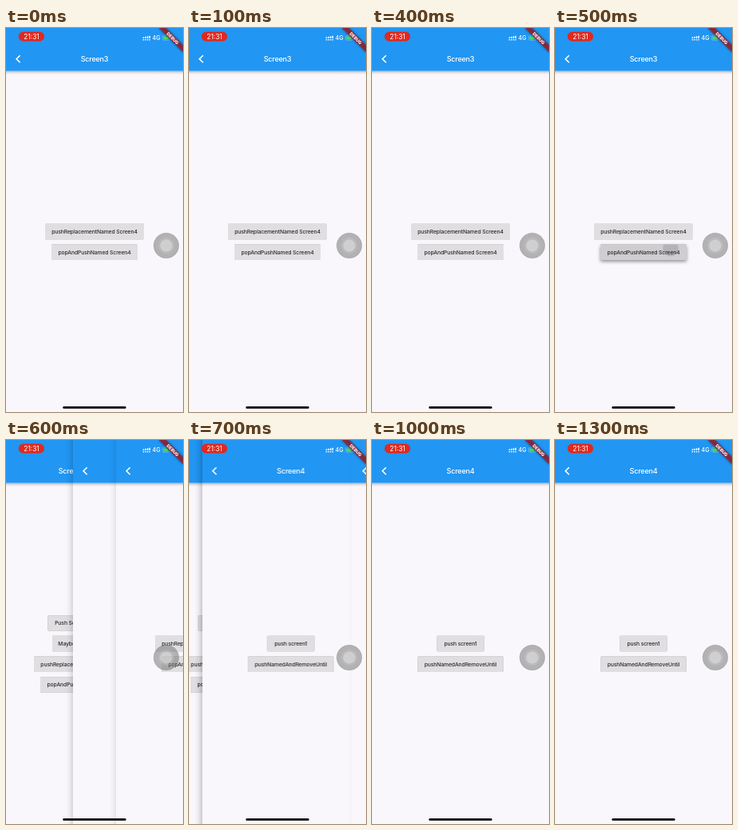
Write an HTML page that moves like this. It is 222 px wide and 480 px high and loops after 1400 ms.

```html
<!DOCTYPE html>
<html lang="en">
<head>
<meta charset="utf-8">
<title>Screen navigation</title>
<style>
  html, body { margin: 0; width: 100%; height: 100%; overflow: hidden; background: #f9f7fb; }
  svg { display: block; width: 222px; height: 480px; overflow: hidden; }
  text { font-family: Inter, Roboto, sans-serif; text-anchor: middle; }
  .title { font-size: 9.1px; font-weight: 500; letter-spacing: -.25px; fill: #fff; }
  .label { font-size: 6.8px; font-weight: 500; letter-spacing: -.12px; fill: #2a2a2a; }
  .btn { fill: #e0dee1; filter: drop-shadow(0 .9px .6px rgba(0,0,0,.38)); }
  .held { fill: #cfcdd0; filter: drop-shadow(0 2px 2px rgba(0,0,0,.42)); }
</style>
</head>
<body>
<svg viewBox="0 0 222 480">
  <defs>
    <linearGradient id="edge">
      <stop offset="0" stop-opacity="0"/>
      <stop offset=".3" stop-opacity=".02"/>
      <stop offset=".6" stop-opacity=".07"/>
      <stop offset="1" stop-opacity=".22"/>
    </linearGradient>
    <linearGradient id="under" x2="0" y2="1">
      <stop offset="0" stop-opacity=".3"/>
      <stop offset=".4" stop-opacity=".12"/>
      <stop offset="1" stop-opacity="0"/>
    </linearGradient>
    <clipPath id="btnClip"><rect x="57" y="270.6" width="108" height="19.4" rx="1"/></clipPath>
    <filter id="soft" x="-20%" y="-100%" width="140%" height="300%"><feGaussianBlur stdDeviation="1.5"/></filter>
  </defs>

  <g id="pages"></g>

  <g id="status">
    <rect x="15.7" y="4.8" width="32.3" height="11.6" rx="5.6" fill="#e0291f"/>
    <text x="32" y="13.5" font-size="8.3" fill="#fff">21:31</text>
    <g id="signal" fill="#fff"></g>
    <text x="188.6" y="15.4" font-size="7.2" font-weight="500" fill="#fff">4G</text>
    <rect x="196.4" y="9.4" width="9.5" height="6" rx="1.7" fill="none" stroke="#fff" stroke-opacity=".4" stroke-width=".6"/>
    <rect x="197.4" y="10.4" width="6.4" height="4" rx="1" fill="#4cd964"/>
  </g>

  <g transform="translate(222 0) rotate(45)">
    <rect x="-21.4" y="15" width="42.9" height="6.4" opacity=".5" filter="url(#soft)"/>
    <rect x="-21.4" y="15" width="42.9" height="6.4" fill="#a81c24" fill-opacity=".75"/>
    <text x="0" y="20.2" font-size="5.5" font-weight="800" fill="#fff">DEBUG</text>
  </g>

  <g id="assist">
    <circle cx="201" cy="272" r="15.8" fill="#777" fill-opacity=".54" stroke="#777" stroke-opacity=".35" stroke-width=".8"/>
    <circle cx="201" cy="272" r="10.2" fill="#fff" fill-opacity=".1"/>
    <circle cx="201" cy="272" r="7.6" fill="#fff" fill-opacity=".3"/>
  </g>
  <rect x="71.3" y="473.1" width="79.3" height="2.6" rx="1.3"/>
</svg>

<script>
const LOOP = 1400, WIDTH = 222, MID = WIDTH / 2, ROW = 25.7, OFF = 260;
const pages = document.getElementById('pages');

function add(parent, tag, attrs, text) {
  const el = document.createElementNS('http://www.w3.org/2000/svg', tag);
  for (const key in attrs) el.setAttribute(key, attrs[key]);
  if (text) el.textContent = text;
  parent.append(el);
  return el;
}

function addButton(page, label, width, y) {
  const g = add(page, 'g', {});
  const face = { x: MID - width / 2, y: y - 9.7, width, height: 19.4, rx: 1 };
  add(g, 'rect', { class: 'btn', ...face });
  const press = add(g, 'g', { opacity: 0 });
  add(press, 'rect', { class: 'held', ...face });
  add(g, 'text', { class: 'label', x: MID, y: y + 2.3 }, label);
  return press;
}

function addPage(title, buttons) {
  const page = add(pages, 'g', {});
  const shade = add(page, 'rect', { x: -11, width: 11, height: 480, fill: 'url(#edge)' });
  add(page, 'rect', { width: WIDTH, height: 480, fill: '#f9f7fb' });
  add(page, 'rect', { y: 53.6, width: WIDTH, height: 4.5, fill: 'url(#under)' });
  add(page, 'rect', { width: WIDTH, height: 53.6, fill: '#2196f3' });
  add(page, 'path', { d: 'M17.7 34.2L13.1 38.7L17.7 43.2', fill: 'none', stroke: '#fff', 'stroke-width': 1.6 });
  add(page, 'text', { class: 'title', x: MID, y: 42.1 }, title);
  const top = 267.4 - (buttons.length - 1) * ROW / 2;
  const presses = buttons.map(([label, width], i) => addButton(page, label, width, top + i * ROW));
  return { page, shade, presses };
}

// Each step is [time, value]; a value holds until the next step.
function hold(el, prop, steps) {
  const frames = steps.map(([time, value]) => ({ offset: time / LOOP, [prop]: value, easing: 'steps(1, end)' }));
  frames.push({ offset: 1, [prop]: steps[steps.length - 1][1] });
  el.animate(frames, { duration: LOOP, iterations: Infinity });
}

// The edge shadow fades as the page moves off to the right.
function slide({ page, shade }, steps) {
  hold(page, 'transform', steps.map(([time, x]) => [time, `translateX(${x}px)`]));
  hold(shade, 'opacity', steps.map(([time, x]) => [time, Math.max(0, 1 - Math.abs(x) / WIDTH)]));
}

const second = addPage('Screen2', [
  ['Push Screen3', 61], ['Maybe pop', 50], ['pushReplacementNamed', 96], ['popAndPushNamed', 80]
]);
const fourth = addPage('Screen4', [['push screen1', 59], ['pushNamedAndRemoveUntil', 107]]);
const third = addPage('Screen3', [['pushReplacementNamed Screen4', 124], ['popAndPushNamed Screen4', 108]]);

const press = third.presses[1];
const ripple = add(press, 'g', { 'clip-path': 'url(#btnClip)' });
add(ripple, 'circle', { cx: 145, cy: 275.5, r: 9.8, fill: '#b4b3b7' });

const signal = document.getElementById('signal');
for (let i = 0; i < 4; i++) {
  const x = 171.6 + i * 2.6, h = 1.8 + i * 0.5;
  add(signal, 'rect', { x, y: 13 - h, width: 1.6, height: h, rx: .4 });
  add(signal, 'rect', { x, y: 13.9, width: 1.6, height: 1.5, rx: .4 });
}

slide(second, [[0, 0], [600, -28], [700, -69], [800, -74]]);
slide(fourth, [[0, OFF], [600, 84], [700, 16.7], [800, 0]]);
slide(third, [[0, 0], [600, 138], [700, 205.2], [800, OFF]]);
hold(press, 'opacity', [[0, 0], [500, 1], [600, 0]]);
</script>
</body>
</html>
```
